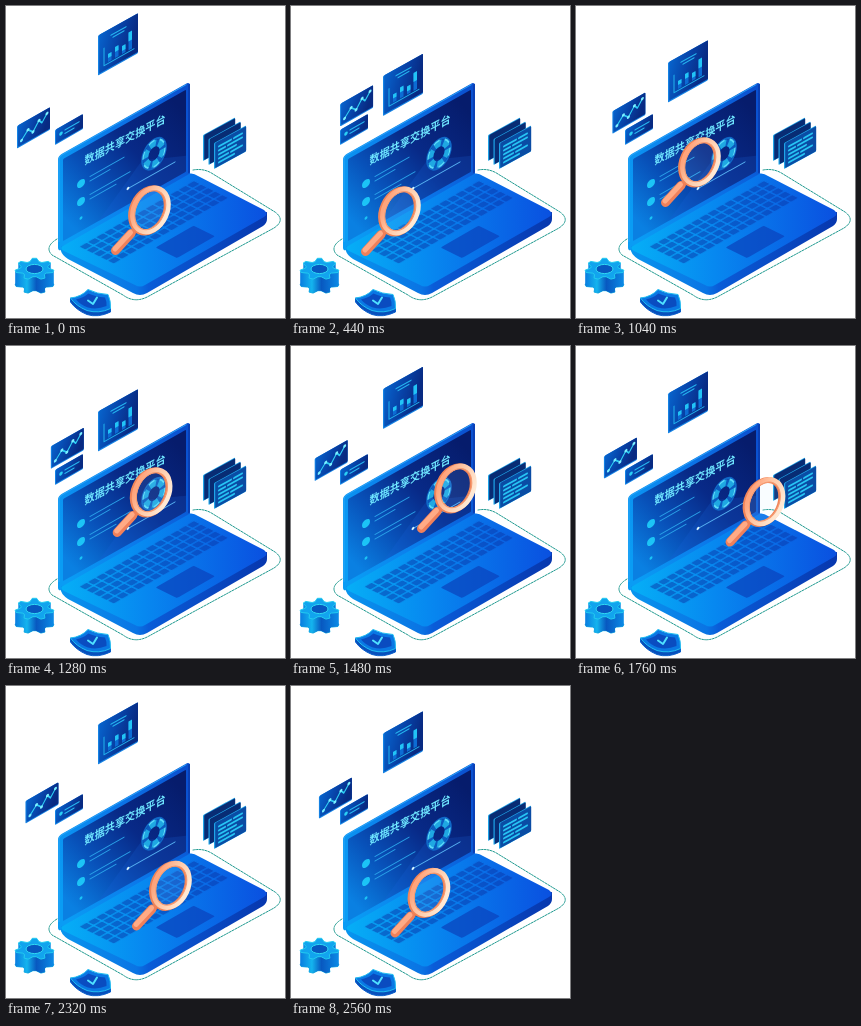
Write an HTML page that moves like this. It is 279x312 px and loops after 2600 ms.

```html
<!DOCTYPE html>
<html lang="zh">
<head>
<meta charset="utf-8">
<style>
html, body { margin: 0; width: 100%; height: 100%; overflow: hidden; background: #fff; }
svg { display: block; width: 279px; height: 312px; }
.title { font: 700 11.2px "Noto Sans CJK SC", "Noto Sans CJK", sans-serif; fill: #6fe6ff; }
.line { fill: none; stroke-linecap: round; stroke-linejoin: round; }
</style>
</head>
<body>
<svg viewBox="0 0 279 312">
  <defs>
    <linearGradient id="panel" x1="0" y1="0" x2="1" y2=".3">
      <stop offset="0" stop-color="#0763cc"/><stop offset=".55" stop-color="#0741a6"/><stop offset="1" stop-color="#082a82"/>
    </linearGradient>
    <linearGradient id="screen" x1="0" y1=".7" x2="1" y2=".3">
      <stop offset="0" stop-color="#0a80e2"/><stop offset=".3" stop-color="#0850b8"/>
      <stop offset=".6" stop-color="#082a88"/><stop offset="1" stop-color="#061c6c"/>
    </linearGradient>
    <linearGradient id="frame" x1="0" y1=".5" x2="1" y2=".3">
      <stop offset="0" stop-color="#0a9cf4"/><stop offset=".5" stop-color="#0b78ea"/><stop offset="1" stop-color="#0a50d0"/>
    </linearGradient>
    <linearGradient id="deck" x1="57" y1="0" x2="261" y2="0" gradientUnits="userSpaceOnUse">
      <stop offset="0" stop-color="#06aef6"/><stop offset=".4" stop-color="#0788f0"/><stop offset="1" stop-color="#0a50e0"/>
    </linearGradient>
    <linearGradient id="side" x1="57" y1="0" x2="261" y2="0" gradientUnits="userSpaceOnUse">
      <stop offset="0" stop-color="#0894ee"/><stop offset=".36" stop-color="#0a74e4"/><stop offset=".42" stop-color="#0a5cd8"/><stop offset="1" stop-color="#0737ae"/>
    </linearGradient>
    <linearGradient id="metal" x1="-19" y1="0" x2="19" y2="0" gradientUnits="userSpaceOnUse">
      <stop offset="0" stop-color="#0a7ee0"/><stop offset=".3" stop-color="#14b4ee"/><stop offset=".55" stop-color="#0858c0"/><stop offset="1" stop-color="#0c8ae6"/>
    </linearGradient>
    <linearGradient id="rim" x1="0" y1="0" x2="1" y2="0">
      <stop offset="0" stop-color="#ffa47c"/><stop offset=".4" stop-color="#ffc6a4"/><stop offset="1" stop-color="#ffe9d4"/>
    </linearGradient>
    <pattern id="keys" width="6.5" height="9.2" patternUnits="userSpaceOnUse">
      <rect x=".5" y=".8" width="5.4" height="7.4" rx=".8" fill="#0a36a8" fill-opacity=".5"/>
    </pattern>
  </defs>

  <!-- floor outline -->
  <path d="M51 233Q38 241 46 249L117 289Q129 298 143 290L268 222Q280 214 269 206L207 168Q198 162 187 164" class="line" stroke="#1f9a90" stroke-width="1" stroke-dasharray="2 1.2"/>

  <!-- laptop lid -->
  <g transform="matrix(1 -.565 0 1 52 150)">
    <rect width="132" height="96" rx="4" fill="url(#frame)"/>
    <path d="M131 3V90" class="line" stroke="#0a3fb4" stroke-width="2"/>
    <path d="M1 86V4Q1 1 4 1H128" class="line" stroke="#2aa6f8" stroke-width="1"/>
    <rect x="5" y="6" width="123" height="82" rx="1" fill="url(#screen)"/>
    <path d="M40 88L84 52L128 72V88Z" fill="#1a64dc" opacity=".2"/>
    <g fill="#1cc4f6">
      <circle cx="23" cy="40.500" r="4"/><circle cx="23" cy="58.500" r="4"/><circle cx="23" cy="75" r="1.500"/>
    </g>
    <g class="line" stroke="#2aa4ea" stroke-width="1">
      <path d="M32 38.500H66M32 43H52M32 56.500H72M32 61H58"/>
      <path d="M70 72H117" stroke="#58b4f4"/>
    </g>
    <circle cx="70" cy="72" r="1.400" fill="#d5f4ff"/>
    <g class="line" transform="translate(96 52) scale(.88 1.05)">
      <circle r="13.500" stroke="#0f68c8" stroke-width="2"/>
      <circle r="9.500" stroke="#0c5cc0" stroke-width="6"/>
      <circle r="9.500" stroke="#1fa8e2" stroke-width="6" stroke-dasharray="7 2.950" stroke-linecap="butt"/>
      <circle r="12.500" stroke="#5cdcf8" stroke-width="1.500" stroke-dasharray="7 6.090" stroke-linecap="butt"/>
    </g>
  </g>
  <text class="title" transform="matrix(.905 -.48 0 1 78.500 159)">数据共享交换平台</text>

  <!-- laptop base -->
  <path d="M55 240V245Q56 249 62 253L127 287Q134 291 141 287L257 220Q261 217 261 213V206Z" fill="url(#side)"/>
  <path d="M56 240.500L184 167.500Q188 167 192 170L258 204Q263 208 258 211L139 279Q134 282 129 279L58 245Q54 243 56 240.500Z" fill="url(#deck)"/>
  <g transform="matrix(1.27 -.73 .77 .38 57 242)">
    <rect x="6.500" y="9.200" width="91" height="46" fill="url(#keys)"/>
    <rect x="34" y="64" width="30" height="28" rx="1.500" fill="#0a42bc" opacity=".7"/>
  </g>

  <!-- stacked documents -->
  <g id="docs"></g>

  <!-- bar chart -->
  <g id="bars"><g transform="matrix(1 -.56 0 1 92 29.500)">
    <rect width="40" height="40" rx="1" fill="#1583e4"/>
    <rect x="1.200" width="38.800" height="38.800" rx="1" fill="url(#panel)"/>
    <path d="M13 7H28M15 10H26" class="line" stroke="#25b4ee" stroke-width="1.200"/>
    <path d="M10 24H13.500V32H10ZM17 22H20.500V32H17ZM24 25H27.500V32H24ZM30.500 15H34V32H30.500Z" fill="#0c6cd4"/>
    <g fill="#22c4f6">
      <rect x="10" y="24" width="3.500" height="4"/><rect x="17" y="21" width="3.500" height="5"/>
      <rect x="24" y="24" width="3.500" height="5"/><rect x="30.500" y="14" width="3.500" height="9"/>
    </g>
    <path d="M6 16V33.500H36" class="line" stroke="#23b4ee"/>
  </g></g>

  <!-- small card -->
  <g transform="matrix(1 -.57 0 1 49 124)">
    <rect width="28" height="15" rx="1" fill="#1583e4"/>
    <rect x="1" width="27" height="14" rx="1" fill="url(#panel)"/>
    <circle cx="6" cy="7" r="1.800" fill="#2cd0f5"/>
    <path d="M10 5.500H24M10 9H19" class="line" stroke="#28b8f0" stroke-width="1.300"/>
  </g>

  <!-- line chart -->
  <g id="trend"><g transform="matrix(1 -.57 0 1 11 120)">
    <rect width="33" height="22.500" rx="1" fill="#1583e4"/>
    <rect x="1" width="32" height="21.500" rx="1" fill="url(#panel)"/>
    <path d="M4.500 17L11 10L16 15L22 7L25 11L30 4.500" class="line" stroke="#2fd0f6" stroke-width="1.400"/>
    <g fill="#7cf0ff">
      <circle cx="4.500" cy="17" r="1.500"/><circle cx="11" cy="10" r="1.500"/><circle cx="16" cy="15" r="1.500"/>
      <circle cx="22" cy="7" r="1.500"/><circle cx="30" cy="4.500" r="1.500"/>
    </g>
  </g></g>

  <g id="gear" transform="translate(28.500 263)"></g>

  <!-- shield -->
  <g id="shield">
    <path d="M64.500 292V296Q70 304 81 308.500Q92 312 104.500 306V302Z" fill="#0850bc" stroke="#0a60cc"/>
    <path d="M64.500 292Q75 291 82 283.500Q91 288 102 288.500Q105 295 104.500 302.500Q93 308 81 304.500Q70 300 64.500 292Z" fill="#0a78e4" stroke="#22bff0"/>
    <path d="M70 293.500Q77 292 82.500 287.500Q90 291 99 291.500Q101 296 100.500 300Q91 304 82 301.500Q74 298.500 70 293.500Z" fill="#0a4cc0"/>
    <path d="M82 294.500L87 298L91 291.500" class="line" stroke="#4fe0ff" stroke-width="2"/>
  </g>

  <!-- magnifier -->
  <g id="glass">
    <path d="M-12 18L-20 26" class="line" stroke="#e2703f" stroke-width="5"/>
    <path d="M-19 23.500L-34.500 40.500" class="line" stroke="#f0805a" stroke-width="9"/>
    <path d="M-19.500 22.500L-35 39" class="line" stroke="#ffab86" stroke-width="5"/>
    <g transform="rotate(25)" fill="none">
      <ellipse rx="16" ry="22" fill="#bfe0ff" fill-opacity=".09"/>
      <ellipse cx="-.8" cy=".8" rx="16.500" ry="23" stroke="#f08458" stroke-width="6"/>
      <ellipse cx=".4" cy="-.2" rx="16.500" ry="23" stroke="url(#rim)" stroke-width="5"/>
      <ellipse cx=".3" rx="14.200" ry="20.600" stroke="#f59a70" stroke-width="1"/>
    </g>
  </g>
</svg>
<script>
const $ = id => document.getElementById(id);
const LOOP = 2600, STEP = 40;

// three sheets, back to front
$('docs').innerHTML = [0, 1, 2].map(i => `
  <g transform="matrix(1 -.55 0 1 ${197 + i * 5.5} ${129 + i * 4})">
    <rect width="32" height="26" rx="1" fill="#1fa4e8"/>
    <rect x="1.2" y=".8" width="31" height="25" rx="1" fill="${i < 2 ? '#082c74' : '#0a4ca4'}"/>
    ${i < 2 ? '' : `<path d="M5 6H17M20 6H28M5 10H11M14 10H28M5 14H22M5 18H14M17 18H28M5 22H20"
      class="line" stroke="#27c4f4" stroke-width="2"/>`}
  </g>`).join('');

// extruded gear
function gearPath(teeth, outer, inner) {
  const pts = [];
  for (let i = 0; i < teeth * 4; i++) {
    const a = (i + .5) * Math.PI / teeth / 2, r = i % 4 < 2 ? outer : inner;
    pts.push((r * Math.cos(a)).toFixed(1) + ' ' + (r * .55 * Math.sin(a)).toFixed(1));
  }
  return 'M' + pts.join('L') + 'Z';
}
const cog = gearPath(7, 19.5, 14);
let layers = '';
for (let y = 14; y > 0; y--) {
  layers += `<path d="${cog}" transform="translate(0 ${y})" fill="url(#metal)"/>`;
}
$('gear').innerHTML = `<path d="${cog}" transform="translate(0 14)" fill="#0a50b8" stroke="#1fb4e4"/>${layers}
  <path d="${cog}" fill="#12a4ee" stroke="#22ccf0" stroke-linejoin="round"/>
  <ellipse rx="8.5" ry="4.6" fill="#0858c0" stroke="#2fd8f2"/>`;

// magnifier route: time, x, y
const route = [
  [0, 144, 204], [220, 125, 213], [440, 109, 205], [680, 101, 184.5],
  [1040, 124, 156], [1480, 165, 142], [1680, 184, 150], [1860, 191.5, 164],
  [2040, 189.5, 181], [2300, 167, 198.5], [2560, 138.5, 206.5]
];

function slope(i, axis) {
  const a = route[Math.max(i - 1, 0)], b = route[Math.min(i + 1, route.length - 1)];
  return (b[axis] - a[axis]) / (b[0] - a[0]);
}

// cubic Hermite interpolation
function along(t, axis) {
  let i = 0;
  while (i < route.length - 2 && t >= route[i + 1][0]) i++;
  const a = route[i], b = route[i + 1], d = b[0] - a[0], u = (t - a[0]) / d, v = 1 - u;
  return a[axis] * v * v * (1 + 2 * u) + b[axis] * u * u * (3 - 2 * u)
    + d * u * v * (slope(i, axis) * v - slope(i + 1, axis) * u);
}

function move(id, x, y) {
  $(id).setAttribute('transform', `translate(${x.toFixed(2)} ${y.toFixed(2)})`);
}

function draw(now) {
  const t = Math.floor(now % LOOP / STEP) * STEP;
  const k = 1 - Math.abs(t % 800 / 400 - 1);
  move('bars', 0, 45 * k);
  move('trend', 42.3 * k, -24.5 * k);
  move('glass', along(t, 1), along(t, 2));
}

const start = performance.now();
function tick() {
  draw(performance.now() - start);
  requestAnimationFrame(tick);
}
tick();
</script>
</body>
</html>
```
